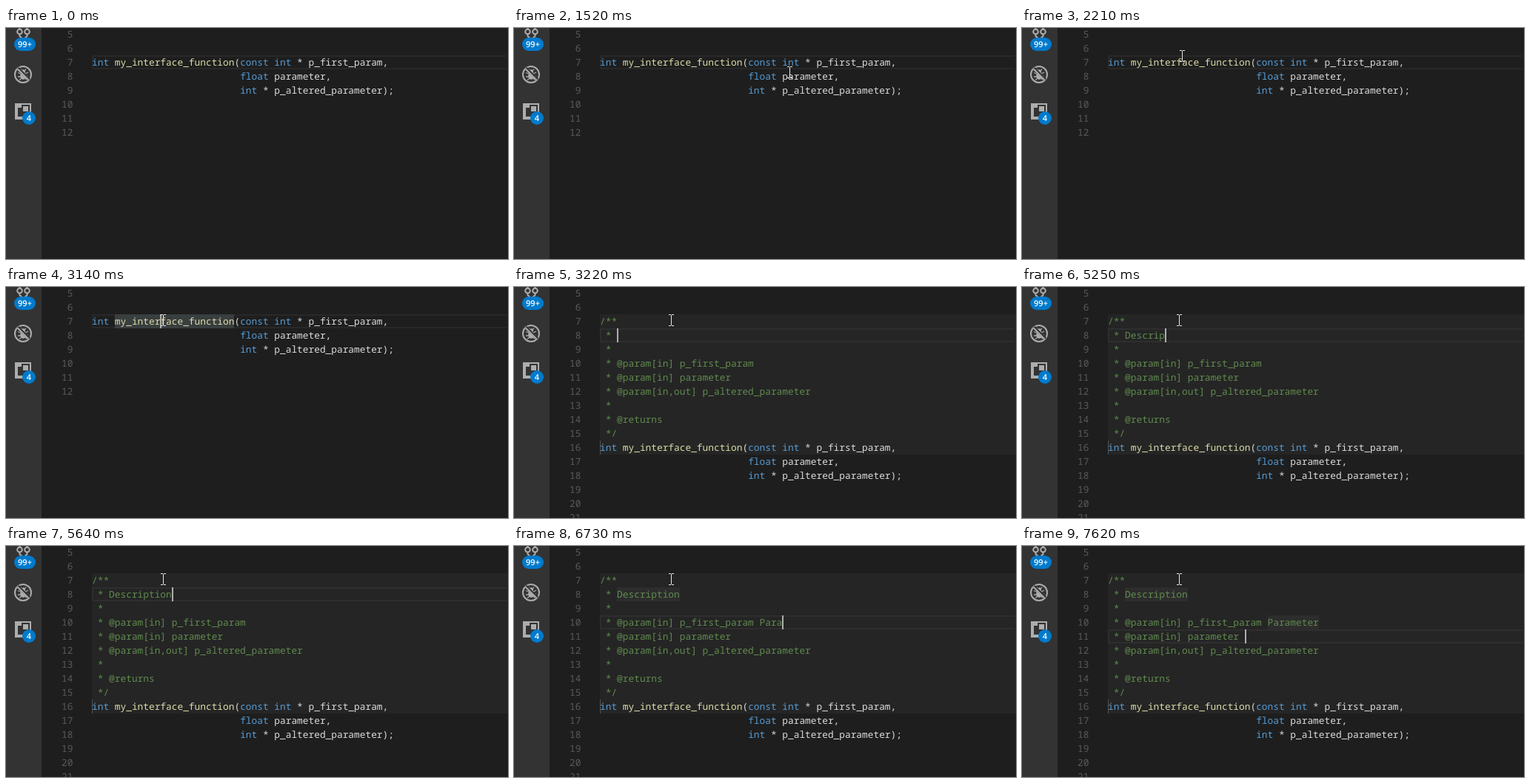
Animation of 678 by 313 pixels, one loop 8000 ms. Source, as an HTML page:

```html
<!DOCTYPE html>
<html lang="en">
<head>
<meta charset="utf-8">
<title>Doc comment typing</title>
<style>
  html, body { margin: 0; width: 100%; height: 100%; overflow: hidden; background: #1e1e1e; }
  #stage {
    position: relative; width: 678px; height: 313px; overflow: hidden; background: #1e1e1e;
    font: 12.83px/19px "Noto Sans Mono", monospace; color: #dcdcdc;
    text-rendering: geometricPrecision;
  }
  #stage div, #stage svg { position: absolute; }
  .line, .number { white-space: pre; height: 19px; }
  .line { left: 116px; }
  .number { left: 60px; width: 30.4px; text-align: right; color: #5a5a5a; }
  .keyword { color: #569cd6; }
  .name { color: #dcdcaa; }
  .comment { color: #608b4e; }
  .mark { height: 19px; }
  #band { left: 116px; top: 37px; width: 562px; height: 190px; background: #252525; }
  #end { left: 116px; top: 208px; width: 1px; height: 19px; background: #555; }
  #current {
    left: 116px; width: 560px; height: 19px; box-sizing: border-box;
    border: 2px solid rgba(255, 255, 255, .045); border-right: 0;
  }
  #caret { width: 2px; height: 19px; background: #aeafad; }
  #bar { left: 0; top: 0; }
</style>
</head>
<body>
<div id="stage">
  <div id="band"></div>
  <div id="current"></div>
  <div id="marks"></div>
  <div id="text"></div>
  <div id="end"></div>
  <div id="caret"></div>

  <svg id="bar" width="48" height="313" font-family="'Open Sans', sans-serif" font-size="11" font-weight="600" text-anchor="middle">
    <path fill="#333" d="M0 0H48V313H0z"/>
    <g fill="none" stroke="#adadad" stroke-width="2">
      <circle cx="18.5" cy="5" r="3.3"/>
      <circle cx="28.5" cy="5" r="3.3"/>
      <path d="M18.5 8V11L23 15M28.5 8V11L24 15M18.5 2V-2M28.5 2V-2"/>
    </g>
    <rect x="11" y="13" width="29" height="18" rx="9" fill="#007acc"/>
    <text x="25.5" y="26" fill="#fff">99+</text>

    <g fill="none" stroke="#adadad">
      <circle cx="23" cy="63" r="11" stroke-width="2"/>
      <path stroke-width="1.3" d="M16 60.5L20 62M16 66H20M18 70.5L21 68M30 60L26 62M30 65.5H26M28 70L25.5 68M20 55.5L22 58.5M27 55.5L25 58.5"/>
    </g>
    <ellipse cx="23.2" cy="64.5" rx="4" ry="5.3" fill="#adadad"/>
    <circle cx="23.4" cy="58.8" r="2.5" fill="#adadad"/>
    <path d="M15.8 54.3L31.7 70.2" stroke="#333" stroke-width="4"/>
    <path d="M15.3 55.3L30.7 70.7" stroke="#adadad" stroke-width="2"/>

    <path fill="#adadad" d="M12 102H34V124H12z"/>
    <path fill="#333" d="M16 108H28V120H16z"/>
    <path fill="#adadad" stroke="#333" stroke-width="2" d="M22 105H31V114H22z"/>
    <circle cx="31" cy="122" r="9" fill="#007acc"/>
    <text x="31" y="126" fill="#fff">4</text>
  </svg>

  <svg id="pointer" width="7" height="16" fill="none" stroke="#e8e8e8">
    <path d="M0 .5H3M4 .5H7M3.5 1V15M0 15.5H3M4 15.5H7"/>
  </svg>
</div>

<script>
const LOOP = 8000, CHAR = 7.7, LEFT = 116, ROW = 19;
const INSERTED = 3220, FIRST_TAB = 6040, SECOND_TAB = 7620;

const $ = id => document.getElementById(id);
const rowTop = number => 37 + (number - 7) * ROW;
const column = chars => LEFT + chars * CHAR;
const tag = (kind, text) => `<span class="${kind}">${text}</span>`;

const indent = " ".repeat(26);
const signature = [
  `${tag("keyword", "int")} ${tag("name", "my_interface_function")}(${tag("keyword", "const int")} * p_first_param,`,
  `${indent}${tag("keyword", "float")} parameter,`,
  `${indent}${tag("keyword", "int")} * p_altered_parameter);`
];

// Time at which each letter is typed
const summary = { word: "Description", times: [4310, 4460, 4610, 4780, 4930, 5100, 5250, 5400, 5480, 5560, 5640] };
const detail = { word: "Parameter", times: [6420, 6590, 6660, 6730, 6880, 6980, 7080, 7230, 7310] };

// Pointer position: time, left, top
const pointerSteps = [
  [0, -20, -20], [1440, 376, 0], [1520, 369, 52], [1595, 347, 112], [1675, 315, 147],
  [1750, 282, 163], [1830, 252, 132], [1905, 233, 92], [1985, 221, 54], [2060, 214, 28],
  [2210, 213, 30], [2290, 209, 35], [2440, 209, 37]
];

const typed = ({ word, times }, t) => word.slice(0, times.filter(at => at <= t).length);

const mark = (number, from, length, color) =>
  `<div class="mark" style="left:${column(from)}px;top:${rowTop(number)}px;width:${length * CHAR}px;background:${color}"></div>`;

function stateAt(t) {
  if (t < INSERTED) {
    return {
      lines: signature, last: 12, row: 7, inserted: false,
      caret: t >= 2910 ? 12 : -1,
      marks: t >= 3140 ? mark(7, 4, 21, "#393e3f") : ""
    };
  }
  const first = typed(summary, t), second = typed(detail, t);
  const comment = [
    "/**", ` * ${first}`, " *", ` * @param[in] p_first_param ${second}`,
    " * @param[in] parameter ", " * @param[in,out] p_altered_parameter", " *", " * @returns", " */"
  ];
  const row = t < FIRST_TAB ? 8 : t < SECOND_TAB ? 10 : 11;
  const blinkedOff = t >= 3680 && t < 4230;
  return {
    lines: [...comment.map(text => tag("comment", text)), ...signature],
    last: 21, row, inserted: true,
    caret: blinkedOff ? -1 : comment[row - 7].length,
    marks: (t >= FIRST_TAB ? mark(8, 3, summary.word.length, "#2d2d2d") : "") +
           (t >= SECOND_TAB ? mark(10, 28, detail.word.length, "#2d2d2d") : "")
  };
}

function lineMarkup(lines, last) {
  let html = lines.map((text, i) => `<div class="line" style="top:${rowTop(7 + i)}px">${text}</div>`).join("");
  for (let n = 5; n <= last; n++) html += `<div class="number" style="top:${rowTop(n)}px">${n}</div>`;
  return html;
}

let shown = "";
function draw(t) {
  const [, x, y] = pointerSteps.filter(step => step[0] <= t).pop();
  $("pointer").style.left = x + "px";
  $("pointer").style.top = y + "px";

  const state = stateAt(t), key = JSON.stringify(state);
  if (key === shown) return;
  shown = key;
  $("text").innerHTML = lineMarkup(state.lines, state.last);
  $("marks").innerHTML = state.marks;
  $("band").hidden = $("end").hidden = !state.inserted;
  $("current").style.top = $("caret").style.top = rowTop(state.row) + "px";
  $("caret").hidden = state.caret < 0;
  $("caret").style.left = Math.round(column(state.caret)) + "px";
}

const start = performance.now();
function tick() {
  draw((performance.now() - start) % LOOP);
  requestAnimationFrame(tick);
}
tick();
</script>
</body>
</html>
```
